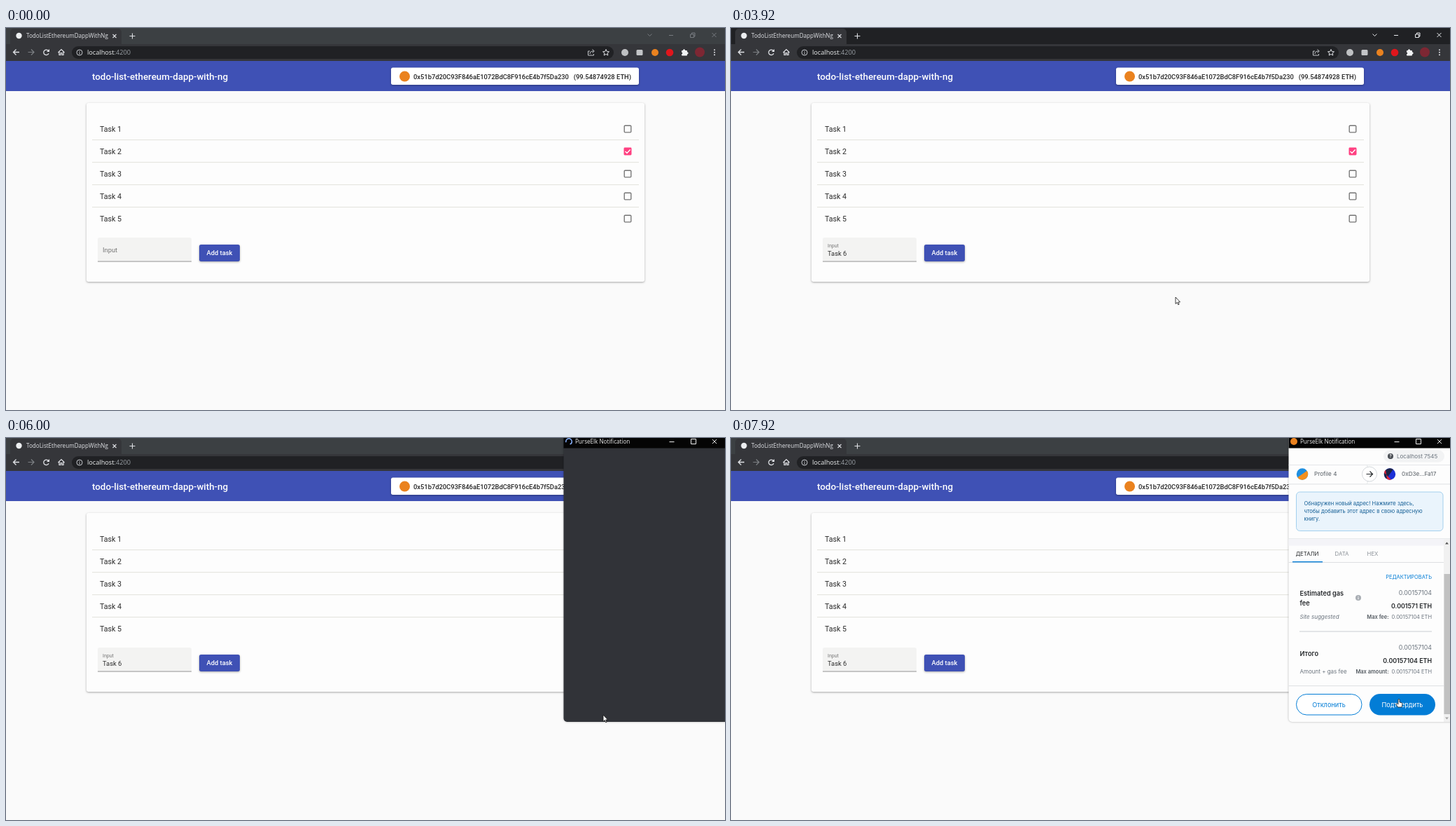
An HTML page with a canvas that plays this animation: 1027x545 px, repeating every 8 s.

```html
<!DOCTYPE html>
<html lang="en">
<head>
<meta charset="utf-8">
<title>Todo list</title>
<style>
  html, body { margin: 0; width: 100%; height: 100%; overflow: hidden; background: #fafafa; }
  canvas { display: block; }
</style>
</head>
<body>
<canvas id="stage" width="1027" height="545"></canvas>
<script>
const ctx = document.getElementById('stage').getContext('2d');
const LOOP = 8000;
const UI = '"Open Sans", sans-serif', APP = 'Roboto, sans-serif', WALLET = 'Inter, sans-serif';
const INDIGO = '#3f51b5', ORANGE = '#ea821f', BLUE = '#037dd6', GREY = '#6a737d';

// Moments of the story, in ms
const CLICK = 500, SUBMIT = 3000, POPUP = 5500, LOADED = 6340, READY = 7500;
const KEYS = [1250, 1330, 1420, 1500, 1670, 2000];
// Pointer moves: start, end, from x, y, to x, y
const MOVES = [
  [90, 480, -12, 250, 190, 320],
  [2080, 2590, 190, 320, 302, 323],
  [3080, 3590, 302, 323, 635, 384],
  [3920, 4340, 635, 384, 853, 395],
  [6400, 6900, 853, 395, 954, 373]
];

const ramp = (t, a, b) => Math.min(1, Math.max(0, (t - a) / (b - a)));
const ease = p => p * p * (3 - 2 * p);
const mix = (a, b, p) => a + (b - a) * p;

function rect(x, y, w, h, fill) {
  ctx.fillStyle = fill;
  ctx.fillRect(x, y, w, h);
}

function box(x, y, w, h, r, fill, stroke, lw = 1) {
  ctx.beginPath();
  ctx.roundRect(x, y, w, h, r);
  if (fill) { ctx.fillStyle = fill; ctx.fill(); }
  if (stroke) { ctx.strokeStyle = stroke; ctx.lineWidth = lw; ctx.stroke(); }
}

function disc(x, y, r, fill, stroke, lw) {
  box(x - r, y - r, 2 * r, 2 * r, r, fill, stroke, lw);
}

function raised(x, y, w, h, r, fill) {
  ctx.save();
  ctx.shadowColor = 'rgba(0,0,0,.34)';
  ctx.shadowBlur = 3;
  ctx.shadowOffsetY = 1;
  box(x, y, w, h, r, fill);
  ctx.restore();
}

function arc(x, y, r, from, to, color, lw) {
  ctx.beginPath();
  ctx.arc(x, y, r, from, to);
  ctx.strokeStyle = color;
  ctx.lineWidth = lw;
  ctx.stroke();
}

// SVG path data, placed at x, y
function path(d, x, y, { stroke, fill, lw = 1.1 }) {
  const p = new Path2D(d);
  ctx.save();
  ctx.translate(x, y);
  ctx.lineWidth = lw;
  if (fill) { ctx.fillStyle = fill; ctx.fill(p); }
  if (stroke) { ctx.strokeStyle = stroke; ctx.stroke(p); }
  ctx.restore();
}

function text(s, x, y, font, color, align = 'left') {
  ctx.font = font;
  ctx.fillStyle = color;
  ctx.textAlign = align;
  ctx.fillText(s, x, y);
}

const CROSS = 'M-3-3L3 3M3-3L-3 3';

function drawBrowser(active) {
  const light = '#dfe1e5', ctl = active ? '#e8eaed' : '#777b80';
  rect(0, 0, 1027, 24, active ? '#202124' : '#3c4043');
  box(6, 1, 159, 24, [5, 5, 0, 0], '#35363a');
  rect(0, 23, 1027, 24, '#35363a');
  disc(18.5, 11, 4.2, '#eceef0');
  text('TodoListEthereumDappWithNg', 29, 14.3, '8.1px ' + UI, light);
  path('M-2.5-2.5L2.5 2.5M2.5-2.5L-2.5 2.5', 155, 11.5, { stroke: light });
  path('M-4 0H4M0-4V4', 180.5, 11.5, { stroke: light });

  path('M-3-1.5L0 1.5L3-1.5', 919.5, 10, { stroke: ctl, lw: 1 });
  path('M-3 0H3', 950, 10.5, { stroke: ctl, lw: 1 });
  path('M-3-1H2V3.500H-3ZM-1-1V-3H3.500V2H2', 980.5, 10, { stroke: ctl, lw: 1 });
  path(CROSS, 1011.5, 10, { stroke: ctl, lw: 1 });

  box(94, 26, 774, 18, 9, '#202124');
  path('M4.500 0H-4M0-4L-4 0L0 4', 14.5, 34.5, { stroke: light, lw: 1.3 });
  path('M-4.500 0H4M0-4L4 0L0 4', 36, 34.5, { stroke: '#7d8084', lw: 1.2 });
  arc(57.5, 34.8, 3.7, 0.4, 5.5, light, 1.3);
  path('M4.500-4.500V-.5H.5Z', 57.5, 34.5, { fill: light });
  path('M-4.500 .5L0-4L4.500 .5M-3-.5V4H-1V1H1V4H3V-.5', 79, 34.5, { stroke: light, lw: 1.2 });
  disc(105, 35, 4, null, '#c4c7cb', 1);
  path('M0-.5V2.500M0-2.300V-1.200', 105, 35, { stroke: '#c4c7cb', lw: 1 });
  text('localhost', 116, 38.2, '9.2px ' + UI, '#f1f3f4');
  text(':4200', 116 + ctx.measureText('localhost').width, 38.2, '9.2px ' + UI, '#9aa0a6');

  path('M-2-2H-4.500V4H3.500V2M-2 2C-2-1 0-2 3-2M1.500-4.500L4.300-2L1.500 .5', 836, 35, { stroke: '#c4c7cb', lw: 1 });
  path('M0-4.500L1.300-1.500L4.500-1.200L2.100 .9L2.800 4L0 2.400L-2.800 4L-2.100 .9L-4.500-1.200L-1.300-1.500Z', 857, 35, { stroke: light, lw: 1 });
  disc(884, 35, 5, '#bfc1c3');
  box(900.5, 31, 9, 8, 1.5, '#c3c5c7');
  disc(927, 35, 5, ORANGE);
  disc(948, 35, 5.3, '#e0161c');
  box(965, 32, 8, 7.5, 1, '#f1f3f4');
  disc(968.5, 31.8, 1.6, '#f1f3f4');
  disc(973, 35.8, 1.6, '#f1f3f4');
  disc(965, 36, 1.2, '#35363a');
  disc(991, 34.5, 7, '#7d2733');
  for (const dy of [-3.5, 0, 3.5]) disc(1012, 34.8 + dy, 1, light);
}

function drawTask(i) {
  const y = 144 + 32 * i, done = i === 1;
  text('Task ' + (i + 1), 134, y + 3.8, '10.67px ' + APP, '#2b2b2b');
  if (i < 4) rect(123, y + 15.3, 781, 0.8, '#dcdcd4');
  if (done) {
    box(882.5, y - 5.5, 11, 11, 1.4, '#ff4081');
    path('M-3.500 0L-1 2.500L3.600-2.500', 888, y, { stroke: '#fff', lw: 1.3 });
  } else {
    box(883.2, y - 4.8, 9.6, 9.6, 1, null, '#747474', 1.35);
  }
}

function drawField(t) {
  const focused = t >= CLICK && t < SUBMIT;
  const up = ease(ramp(t, CLICK, CLICK + 200));
  box(131, 299, 134, 34.5, [3, 3, 0, 0], '#f3f3f2');
  rect(131, focused ? 332 : 332.6, 134, focused ? 1.5 : 0.9, focused ? INDIGO : '#8c8c8c');
  text('Input', 138, mix(320.3, 312.8, up), mix(9.35, 7, up) + 'px ' + APP, focused ? INDIGO : '#787878');

  const typed = KEYS.filter(k => t >= k).length;
  const value = 'Task 6'.slice(0, typed);
  text(value, 138, 324.6, '9.35px ' + APP, '#2b2b2b');
  const since = t - (typed ? KEYS[typed - 1] : CLICK);
  if (focused && since % 1000 < 500) {
    rect(138 + ctx.measureText(value).width, 315.6, 0.9, 11, INDIGO);
  }
}

function drawButton(t) {
  raised(276, 309, 58, 24, 2.7, INDIGO);
  if (t >= SUBMIT && t < 3750) {
    ctx.save();
    ctx.beginPath();
    ctx.rect(276, 309, 58, 24);
    ctx.clip();
    const alpha = 0.12 * (1 - ramp(t, 3250, 3750));
    disc(302, 323, 36 * ease(ramp(t, SUBMIT, 3250)), `rgba(255,255,255,${alpha})`);
    ctx.restore();
  }
  text('Add task', 305, 324.4, '500 9.35px ' + APP, '#fff', 'center');
}

function drawPage(t) {
  rect(0, 47, 1027, 498, '#fafafa');
  rect(0, 47, 1027, 43, INDIGO);
  text('todo-list-ethereum-dapp-with-ng', 123, 73.6, '500 13.35px ' + APP, '#fff');
  raised(550, 56.5, 354, 24.5, 2.7, '#fff');
  disc(569.5, 69, 7.5, ORANGE);
  const font = '500 9.35px ' + APP;
  text('0x51b7d20C93F846aE1072BdC8F916cE4b7f5Da230', 582, 72.8, font, '#222');
  text('(99.54874928 ETH)', 893, 72.8, font, '#222', 'right');

  raised(115, 107, 797, 255, 2.7, '#fdfdfd');
  for (let i = 0; i < 5; i++) drawTask(i);
  drawField(t);
  drawButton(t);
}

function drawSplash(t) {
  disc(913, 175, 49, ORANGE);
  const a = (t - 6960) / 1000 * Math.PI * 2;
  arc(912.5, 250, 7.8, a - 1.9, a + 1.9, '#f0922b', 2);
}

function drawAvatar(x, base, other, tilt) {
  disc(x, 51.5, 8.2, base);
  ctx.beginPath();
  ctx.arc(x, 51.5, 8.2, tilt, tilt + Math.PI);
  ctx.fillStyle = other;
  ctx.fill();
}

function drawFee(y, title, gap, plain, bold, note, cap) {
  const right = 1001;
  title.forEach((line, i) => text(line, 812.5, y + gap + 13.5 * i, '600 9.2px ' + WALLET, '#24272a'));
  text(plain, right, y, '8.8px ' + WALLET, GREY, 'right');
  text(bold, right, y + 18.5, '600 8.9px ' + WALLET, '#24272a', 'right');
  text(note, 812.5, y + 33.5, (cap === 'Max fee:' ? 'italic ' : '') + '8px ' + WALLET, GREY);
  const small = '7.5px ' + WALLET, amount = '0.00157104 ETH';
  text(amount, right, y + 33.5, small, GREY, 'right');
  text(cap, right - 4 - ctx.measureText(amount).width, y + 33.5, '600 ' + small, '#535a61', 'right');
}

function drawDetails(scroll) {
  ctx.save();
  ctx.beginPath();
  ctx.rect(796, 144, 222, 261);
  ctx.clip();
  ctx.translate(0, scroll);
  rect(796, 80, 222, 73.5, '#f4f4f8');
  text('ДЕТАЛИ', 823, 167.7, '7.8px ' + WALLET, '#24272a', 'center');
  text('DATA', 872.5, 167.7, '7.8px ' + WALLET, '#8b9198', 'center');
  text('HEX', 916.5, 167.7, '7.8px ' + WALLET, '#8b9198', 'center');
  rect(796, 177, 222, 0.8, '#d6d9dc');
  rect(802, 176, 43, 1.4, BLUE);
  text('РЕДАКТИРОВАТЬ', 1001, 201.3, '7.5px ' + WALLET, BLUE, 'right');
  drawFee(224, ['Estimated gas', 'fee'], 1, '0.00157104', '0.001571 ETH', 'Site suggested', 'Max fee:');
  disc(896, 228, 4, '#a9aeb4');
  path('M0-.5V2.300M0-2.300V-1.200', 896, 228, { stroke: '#fff', lw: 1 });
  rect(812, 275.5, 189, 1, '#c9cdd2');
  drawFee(302, ['Итого'], 8.5, '0.00157104', '0.00157104 ETH', 'Amount + gas fee', 'Max amount:');
  rect(796, 353.3, 222, 0.8, '#d6d9dc');
  box(807.5, 365.5, 93.5, 29.5, 14.7, '#fff', BLUE);
  text('Отклонить', 854, 383.7, '9.2px ' + WALLET, BLUE, 'center');
  box(912, 365, 94, 30.5, 15.2, BLUE);
  text('Подтвердить', 959, 383.7, '9.2px ' + WALLET, '#fff', 'center');
  ctx.restore();

  rect(1018, 145, 9, 260, '#f1f1f1');
  rect(1018.5, 194 - scroll * 40 / 52, 8.5, 200, '#c1c1c1');
  path('M-2.500 1.500H2.500L0-1.500Z', 1022.5, 150, { fill: '#505050' });
  path('M-2.500-1.500H2.500L0 1.500Z', 1022.5, 400, { fill: '#a3a3a3' });
}

function drawConfirm(t) {
  box(932, 17.5, 87, 17, 8.5, '#f2f3f4');
  disc(942, 26, 4, '#4a4e54');
  text('?', 942, 28.4, '600 6.5px ' + WALLET, '#fff', 'center');
  text('Localhost 7545', 951, 28.9, '8px ' + WALLET, GREY);
  rect(796, 38, 231, 0.8, '#dfe2e5');
  rect(796, 65.5, 231, 0.8, '#d6d9dc');
  drawAvatar(816, '#1f8fe0', '#f4901e', -0.6);
  text('Profile 4', 833, 54.4, '8.2px ' + WALLET, '#535a61');
  path('M0-13.500L4 0L0 13.500', 908.5, 52, { stroke: '#dfe2e5', lw: 0.8 });
  disc(912, 51.5, 10.5, '#fff', '#d0d4d8', 0.9);
  path('M-4.500 0H4M.5-4L4.500 0L.5 4', 912, 51.5, { stroke: '#24272a', lw: 1.2 });
  drawAvatar(941, '#1b2fd6', '#1d2447', 2.2);
  path('M-6-6A8.200 8.200 0 0 0-8-2L2 8A8.200 8.200 0 0 1-4 7Z', 941, 51.5, { fill: '#e0263a' });
  text('0xD3e...Fa17', 958, 54.4, '8.2px ' + WALLET, '#535a61');

  box(807.5, 77, 209.5, 55.5, 5, '#eaf4fc', '#a3d0ee', 1);
  ['Обнаружен новый адрес! Нажмите здесь,', 'чтобы добавить этот адрес в свою адресную', 'книгу.']
    .forEach((line, i) => text(line, 818.5, 96 + 11.2 * i, '7.6px ' + WALLET, '#155f96'));
  rect(796, 143.5, 231, 0.8, '#d6d9dc');
  drawDetails(52 * (1 - ease(ramp(t, 7710, 7915))));
}

function drawPopup(t) {
  const loaded = t >= LOADED;
  ctx.save();
  ctx.shadowColor = 'rgba(0,0,0,.3)';
  ctx.shadowBlur = 3;
  box(796.5, -8, 240, 413, 5, loaded ? '#fdfdfd' : '#313338');
  ctx.restore();
  ctx.save();
  ctx.beginPath();
  ctx.roundRect(796.5, -8, 240, 413, 5);
  ctx.clip();
  if (t >= READY) drawConfirm(t);
  else if (loaded) drawSplash(t);
  rect(796, 0, 231, 14.5, '#050505');
  ctx.restore();
  if (loaded) {
    disc(804, 5, 5, ORANGE);
  } else {
    const a = (t - 5590) / 1000 * Math.PI * 2;
    arc(804, 5, 4.2, a + 0.3, a + 4.9, '#86aef8', 1.5);
  }
  text('PurseElk Notification', 813, 8.3, '8.1px ' + UI, '#f0f0f0');
  path('M-3.500 0H3.500', 951, 5.5, { stroke: '#eee', lw: 1 });
  box(978.5, 1.5, 7, 7, 0, null, '#eee', 1);
  path(CROSS, 1012, 5, { stroke: '#eee', lw: 1 });
}

function drawPointer(t) {
  if (t < MOVES[0][0]) return;
  const [a, b, x0, y0, x1, y1] = MOVES.filter(m => t >= m[0]).pop();
  const p = ease(ramp(t, a, b));
  const x = mix(x0, x1, p), y = mix(y0, y1, p);
  const inside = (l, u, r, d) => x > l && x < r && y > u && y < d;
  if (inside(131, 299, 265, 333)) {
    path('M-2-4.500H-.5L0-4L.5-4.500H2M0-4V4M-2 4.500H-.5L0 4L.5 4.500H2', x, y, { stroke: '#444', lw: 0.9 });
  } else if (inside(276, 309, 334, 333) || t > 7900) {
    path('M-1 0Q0-1 1 0V4L4 4.800Q5 5.300 4.800 7L4 11H-1.500L-4 7Q-4 5.500-2.500 6L-1 7Z', x, y, { fill: '#fff', stroke: '#222', lw: 0.8 });
  } else {
    path('M0 0V9.500L2.200 7.500L3.700 10.800L5.100 10.200L3.700 7H6.500Z', x, y, { fill: '#fff', stroke: '#111', lw: 0.8 });
  }
}

function frame(now) {
  const t = now % LOOP;
  drawPage(t);
  drawBrowser(t >= CLICK && t < POPUP);
  if (t >= POPUP) drawPopup(t);
  drawPointer(t);
  requestAnimationFrame(frame);
}
requestAnimationFrame(frame);
</script>
</body>
</html>
```
